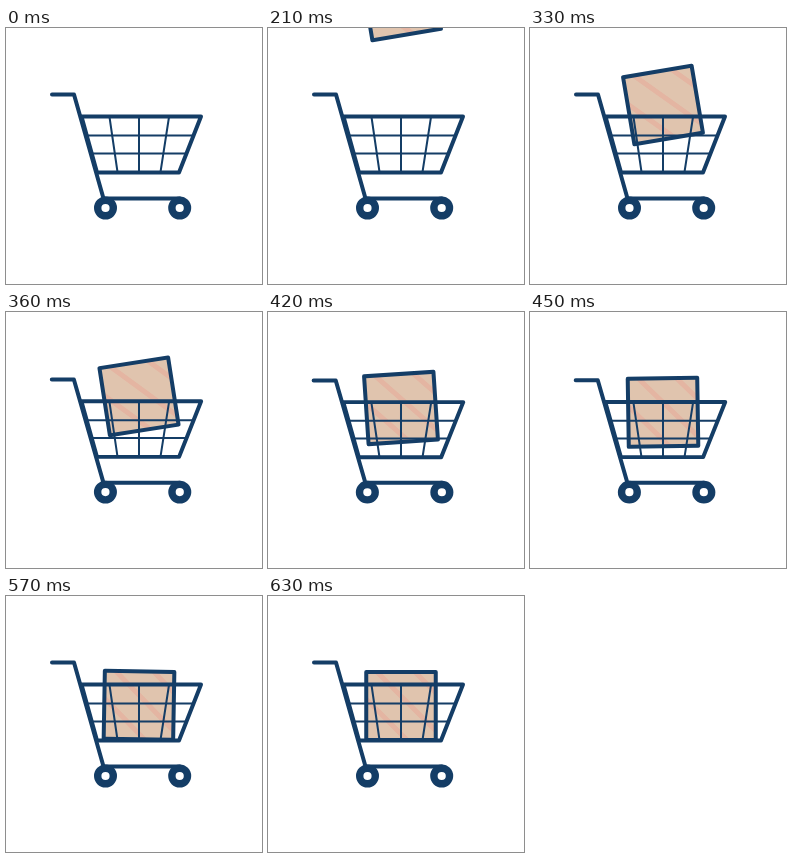
Animation of 256x256 px, one loop 2250 ms. Source, as an HTML page with a canvas:

```html
<!DOCTYPE html>
<html lang="en">
<head>
<meta charset="utf-8">
<title>Add to cart</title>
<style>
html, body { margin: 0; width: 100%; height: 100%; overflow: hidden; background: #fff; }
canvas { display: block; width: 256px; height: 256px; }
</style>
</head>
<body>
<canvas id="stage"></canvas>
<script>
const SIZE = 256, LOOP = 2250, STEP = 30;
const ENTER = 210, HIT = 330, REBOUND = 510, REST = 630;
const NAVY = '#143d66', CARD = '#e0c4ae', STRIPE = '#e4b5a2';
const TILT = -9.6, OVER = 2;

const canvas = document.getElementById('stage');
const ctx = canvas.getContext('2d');
const dpr = window.devicePixelRatio || 1;
canvas.width = canvas.height = SIZE * dpr;

const clamp = v => Math.min(1, Math.max(0, v));
const span = (t, a, b) => clamp((t - a) / (b - a));
const smooth = u => (1 - Math.cos(Math.PI * u)) / 2;

function line(width, points, closed) {
  ctx.beginPath();
  points.forEach(([x, y]) => ctx.lineTo(x, y));
  if (closed) ctx.closePath();
  ctx.lineWidth = width;
  ctx.stroke();
}

function boxY(t) {
  if (t < HIT) {
    const d = t - ENTER;
    return -27 + 0.7 * d + 0.00139 * d * d;
  }
  return 77 + 33 * (1 - Math.pow(1 - span(t, HIT, REST), 2.4));
}

function boxAngle(t) {
  if (t < REBOUND) return TILT + (OVER - TILT) * smooth(span(t, HIT, REBOUND));
  return OVER * (1 - smooth(span(t, REBOUND, REST)));
}

function drawBox(t) {
  const w = 69.5, h = 68;
  ctx.save();
  ctx.translate(133, boxY(t));
  ctx.rotate(boxAngle(t) * Math.PI / 180);
  ctx.beginPath();
  ctx.rect(-w / 2, -h / 2, w, h);
  ctx.fillStyle = CARD;
  ctx.fill();
  ctx.save();
  ctx.clip();
  ctx.strokeStyle = STRIPE;
  for (const d of [-28, 10, 48]) line(5, [[d - 60, -60], [d + 60, 60]]);
  ctx.restore();
  ctx.strokeStyle = NAVY;
  ctx.lineWidth = 4;
  ctx.strokeRect(-w / 2, -h / 2, w, h);
  ctx.restore();
}

function drawCart(t) {
  const squash = 0.016 * Math.sin(Math.PI * span(t, HIT, REBOUND));
  ctx.save();
  ctx.translate(133, 191);
  ctx.scale(1 + squash / 4, 1 - squash);
  ctx.translate(-133, -191);
  ctx.strokeStyle = NAVY;
  line(4, [[46, 66.5], [68, 66.5], [97.5, 170.5], [174, 170.5]]);
  line(4, [[75.5, 88.5], [195, 88.5], [173, 144.5], [91, 144.5]], true);
  line(2, [[81, 107.5], [187, 107.5]]);
  line(2, [[86, 125.5], [180, 125.5]]);
  line(2, [[103.5, 89], [111.5, 144]]);
  line(2, [[133, 89], [133, 144]]);
  line(2, [[163, 89], [154.5, 144]]);
  for (const x of [99.5, 173.7]) {
    ctx.beginPath();
    ctx.arc(x, 180, 7.8, 0, Math.PI * 2);
    ctx.fillStyle = '#fff';
    ctx.fill();
    ctx.lineWidth = 7.4;
    ctx.stroke();
  }
  ctx.restore();
}

function draw(t) {
  ctx.setTransform(dpr, 0, 0, dpr, 0, 0);
  ctx.fillStyle = '#fff';
  ctx.fillRect(0, 0, SIZE, SIZE);
  ctx.lineCap = ctx.lineJoin = 'round';
  if (t >= ENTER) drawBox(t);
  drawCart(t);
}

const start = performance.now();
function tick() {
  const t = (performance.now() - start) % LOOP;
  draw(Math.floor(t / STEP) * STEP);
  requestAnimationFrame(tick);
}
tick();
</script>
</body>
</html>
```
